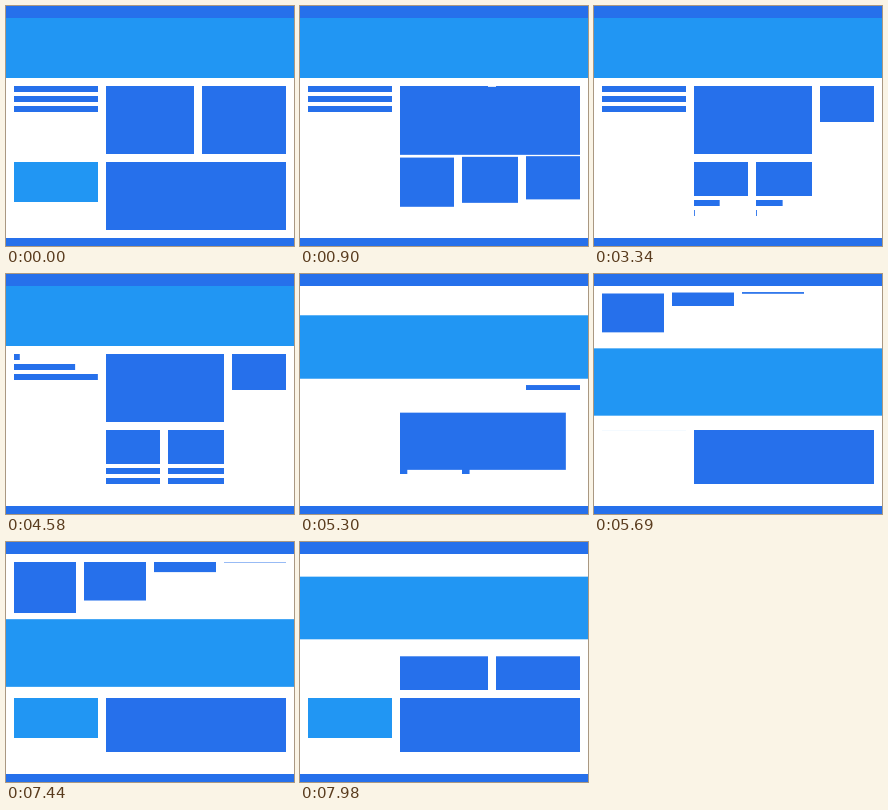
An HTML page with a canvas that plays this animation: 288 by 240 pixels, repeating every 8 s.

```html
<!DOCTYPE html>
<html lang="en">
<head>
<meta charset="utf-8">
<title>Layout blocks</title>
<style>
  html, body { margin: 0; width: 100%; height: 100%; overflow: hidden; background: #fff; }
  canvas { display: block; }
</style>
</head>
<body>
<canvas id="stage" width="288" height="240"></canvas>
<script>
const LOOP = 8000;
const DARK = '#2670eb';
const LIGHT = '#2196f3';
const ctx = document.getElementById('stage').getContext('2d');
let now = 0;

const ease = x => x < 0.5 ? 4 * x ** 3 : 1 - 4 * (1 - x) ** 3;
const step = (start, rect, duration = 600) => ({ start, rect, duration });

// Draws an [x, y, w, h] rectangle after applying its timed moves in order.
function block(color, rect, ...steps) {
  for (const { start, rect: goal, duration } of steps) {
    const p = ease(Math.min(1, Math.max(0, (now - start) / duration)));
    rect = rect.map((v, i) => v + (goal[i] - v) * p);
  }
  const [x, y, w, h] = rect;
  if (w <= 0 || h <= 0) return;
  ctx.fillStyle = color;
  ctx.fillRect(x, y, w, h);
}

function hero() {
  block(LIGHT, [0, 12, 288, 60],
    step(4557, [0, 80, 288, 68], 1564),
    step(7100, [0, 12, 288, 60], 1564));
}

function sidebar() {
  for (let i = 0; i < 3; i++) {
    const y = 80 + 10 * i;
    block(DARK, [8, y, 84, 6], step(4136 + 200 * i, [8, y, 0, 6]));
  }
  block(LIGHT, [8, 156, 84, 40],
    step(-20, [8, 156, 84, 0], 870),
    step(5650, [8, 156, 84, 40]));
}

function upperPair() {
  for (const [x, w] of [[100, 88], [196, 84]]) {
    block(DARK, [x, 80, w, 68],
      step(1000, [x, 148, w, 0], 1),
      step(7532, [x, 112, w, 36]));
  }
}

function mainBlock() {
  block(DARK, [100, 156, 180, 68],
    step(385, [100, 80, 180, 68]),
    step(1850, [100, 80, 118, 68]),
    step(4932, [100, 156, 180, 54]));
  block(DARK, [226, 80, 0, 36],
    step(2277, [226, 80, 54, 36]),
    step(4896, [226, 116, 54, 0]));
}

function card(x, w, enter, shrink, height) {
  block(DARK, [x, 140, w, 0],
    step(enter, [x, 156, w, 68], 680),
    step(shrink, [x, 156, w, height]),
    step(5560, [x, 156, w, 0], 1));
}

function caption(x, w) {
  for (let row = 0; row < 2; row++) {
    const y = 194 + 10 * row;
    block(DARK, [x, y, 0, 6],
      step(3046 + 200 * row, [x, y, w, 6]),
      step(4895 - 200 * row, [x, y, 0, 6]));
  }
}

function topTiles() {
  for (let i = 0; i < 4; i++) {
    const x = 8 + 70 * i;
    block(DARK, [x, 18, 62, 0],
      step(5330 + 120 * i, [x, 20, 62, 52]),
      step(6920 + 140 * (3 - i), [x, 20, 62, 0]));
  }
}

function frame(time) {
  now = time % LOOP;
  ctx.fillStyle = '#fff';
  ctx.fillRect(0, 0, 288, 240);
  hero();
  sidebar();
  upperPair();
  card(100, 54, 500, 2477, 34);
  card(162, 56, 515, 2219, 34);
  card(226, 54, 527, 2151, 0);
  caption(100, 54);
  caption(162, 56);
  mainBlock();
  topTiles();
  block(DARK, [0, 0, 288, 12]);
  block(DARK, [0, 232, 288, 8]);
}

const begin = performance.now();
function tick() {
  frame(performance.now() - begin);
  requestAnimationFrame(tick);
}
tick();
</script>
</body>
</html>
```
